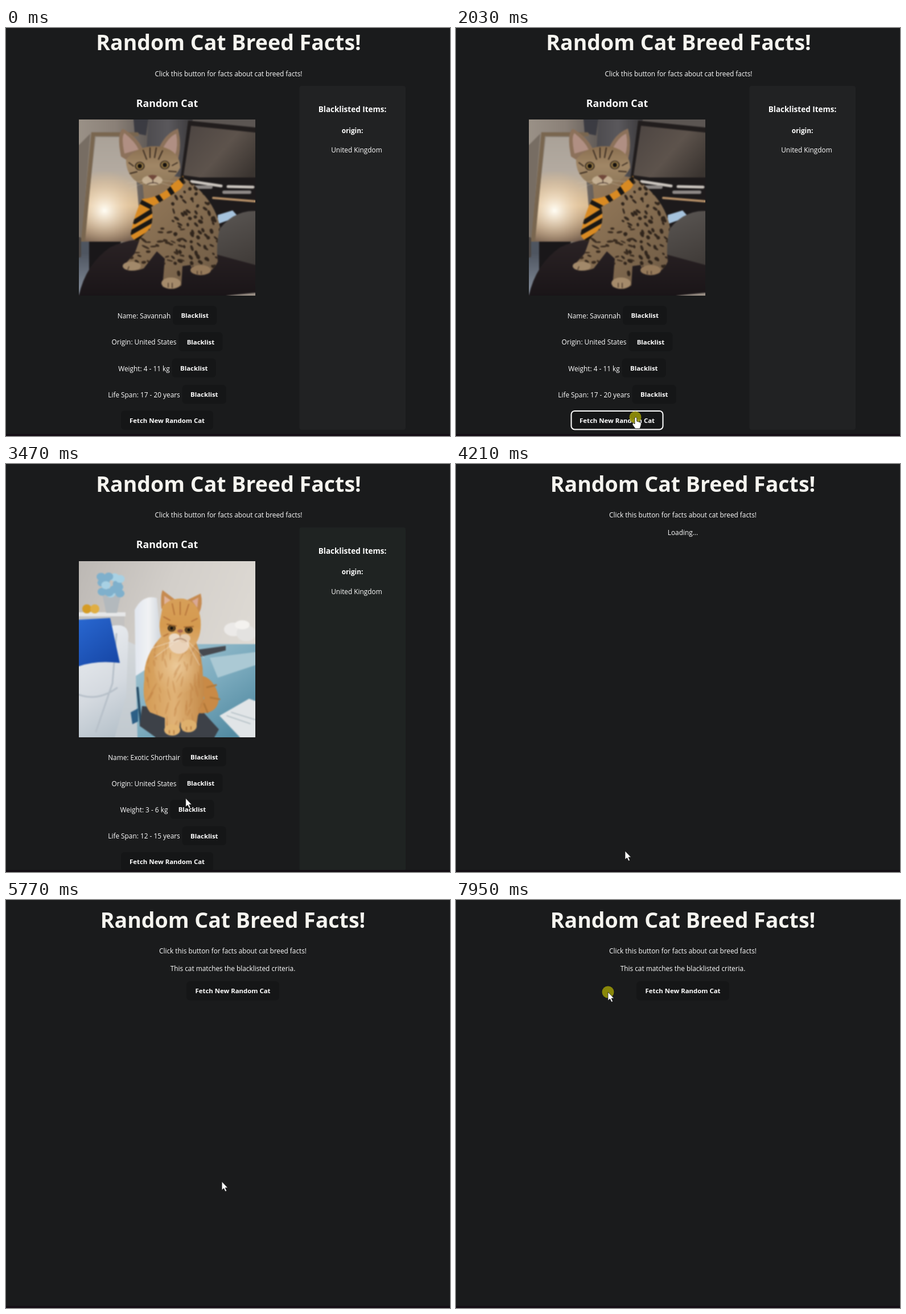
An HTML page with a canvas that plays this animation: 780x718 px, repeating every 8000 ms.

```html
<!DOCTYPE html>
<html lang="en">
<head>
<meta charset="utf-8">
<title>Random Cat Breed Facts!</title>
<style>
html, body { margin: 0; width: 100%; height: 100%; overflow: hidden; background: #1a1b1c; }
canvas { display: block; }
</style>
</head>
<body>
<canvas id="stage" width="780" height="718"></canvas>
<script>
const LOOP = 8000;
const ctx = document.getElementById('stage').getContext('2d');

// ---------- photos, painted once on 310 x 310 canvases ----------
function photo(paint) {
  const canvas = document.createElement('canvas');
  canvas.width = canvas.height = 310;
  const g = canvas.getContext('2d');
  let seed = 7;
  const random = () => (seed = seed * 16807 % 2147483647) / 2147483647;
  g.lineCap = 'round';
  const fill = (color, d) => { g.fillStyle = color; g.fill(new Path2D(d)); };
  const line = (color, width, d) => {
    g.strokeStyle = color; g.lineWidth = width; g.stroke(new Path2D(d));
  };
  const oval = (color, x, y, rx, ry = rx, turn = 0) => {
    g.fillStyle = color; g.beginPath(); g.ellipse(x, y, rx, ry, turn, 0, 7); g.fill();
  };
  const fade = (x0, y0, x1, y1, ...colors) => {
    const f = g.createLinearGradient(x0, y0, x1, y1);
    colors.forEach((c, i) => f.addColorStop(i / (colors.length - 1), c));
    return f;
  };
  const glow = (x, y, r, inner, outer) => {
    const f = g.createRadialGradient(x, y, 0, x, y, r);
    f.addColorStop(0, inner); f.addColorStop(1, outer);
    return f;
  };
  const inside = (d, draw) => { g.save(); g.clip(new Path2D(d)); draw(); g.restore(); };
  // jittered grid of marks within a shape
  const spots = (color, d, x, y, w, h, step, rx, ry, turn) => inside(d, () => {
    for (let j = 0; j < h; j += step)
      for (let i = 0; i < w; i += step)
        oval(color, x + i + random() * step, y + j + random() * step,
          rx * (.5 + random() * .6), ry * (.5 + random() * .6), turn + random());
  });
  const eye = (x, y, color, r) => {
    oval('#2a2019', x, y, r + 2, r + 1); oval(color, x, y, r, r - .5); oval('#15110f', x, y, r * .6);
  };
  paint({ fill, line, oval, fade, glow, inside, spots, eye });
  g.filter = 'blur(0.9px)';
  g.drawImage(canvas, 0, 0);
  return canvas;
}

const ALL = 'M0 0H310V310H0Z';

const savannah = photo(({ fill, line, oval, fade, glow, inside, spots, eye }) => {
  fill(fade(0, 0, 130, 0, '#9a9187', '#8a8077', '#5b5552'), ALL);
  fill('#3b3b42', 'M96 0H122L118 28L98 24Z');
  fill(fade(115, 0, 200, 0, '#4c4a4d', '#5a585c', '#3a383a'), 'M122 0H200L180 130H115Z');
  fill('#776d63', 'M0 45L20 25L3 240H0Z');
  fill(fade(0, 25, 0, 215, '#a9a197', '#b3aaa0', '#d9bd96', '#6e5a4c'), 'M30 31H95L110 215H8Z');
  inside('M30 31H95L110 215H8Z', () => oval(glow(45, 160, 70, '#fffdf5', '#f0c28a00'), 45, 160, 70));
  line('#79664f', 7, 'M102 26H25L5 240');
  fill('#211d1d', 'M192 2L310 14V150H172Z');
  fill(fade(200, 15, 300, 100, '#4f4743', '#5d534c', '#3a3430'), 'M197 11L310 23V116L184 98Z');
  fill('#1d1a1b', 'M170 102H310V205H170Z');
  line('#c9c3bd', 5, 'M198 109L250 117M262 118L306 119');
  line('#8c8785', 6, 'M205 119H232M255 128H300');
  line('#b58f67', 4, 'M236 138L310 144');
  fill('#a6c3dd', 'M244 168L270 160L280 171L244 184Z');
  fill(fade(0, 235, 0, 300, '#4e5560', '#7e8794'), 'M0 215H30V310H0Z');
  fill('#191719', 'M18 215H74L50 270H18Z');
  line('#4a4542', 6, 'M1 210V240');
  fill(fade(250, 160, 290, 260, '#5a5653', '#403b38'), 'M242 200Q268 160 310 161V260L235 240Z');
  fill(fade(0, 210, 0, 310, '#2b2325', '#1a1518'), 'M0 310Q12 255 55 225Q90 208 140 210L310 256V310Z');
  fill('#9a9086', 'M258 310L310 305V310Z');
  const body = 'M112 112Q175 85 205 118Q240 148 248 190Q240 220 244 250Q232 277 202 271L196 256L182 258L180 292Q165 303 147 294L151 245L137 232L114 262Q90 271 77 259L98 236Q115 190 117 172Z';
  fill(fade(110, 120, 240, 250, '#94795a', '#846c50', '#745f48'), body);
  spots('#30251c', body, 165, 105, 80, 160, 12, 5, 3, .4);
  spots('#3a2c20', body, 80, 190, 95, 65, 13, 7, 2.5, -.3);
  oval('#a58b6b', 162, 288, 17, 10); oval('#a2896a', 93, 258, 16, 8); oval('#95795a', 214, 265, 18, 9);
  line('#4a392b', 1.5, 'M157 288V295M164 288V296M88 259L86 264M208 267V272M215 267V272');
  fill('#8c715a', 'M74 65Q66 25 77 16Q102 30 113 53L91 76Z');
  fill('#b08f83', 'M80 60Q74 30 80 24Q99 39 105 53Z');
  fill('#8c715a', 'M140 52Q151 25 174 16Q182 45 173 75Z');
  fill('#b08f83', 'M147 52Q158 30 171 25Q175 46 169 63Z');
  fill(fade(0, 45, 0, 118, '#876c4e', '#a18766', '#8c7658'), 'M83 70Q108 42 146 48Q178 56 178 85Q164 111 139 117Q115 122 96 105Q82 90 83 70Z');
  line('#392b20', 2, 'M113 54L119 70M125 50V67M136 50L133 67M147 55L140 70M88 76L96 82M173 76L164 81M90 95L102 92M171 92L158 91');
  eye(107, 82, '#a9884b', 6.5); eye(151, 80, '#a9884b', 6.5);
  oval('#c2ad90', 129, 107, 18, 9);
  fill('#70483a', 'M121 99Q129 96 138 99L130 107Z');
  line('#41302a', 1.2, 'M130 106V112M120 114Q130 109 139 113');
  line('#d8c9b688', .7, 'M119 107L85 112M119 110L88 122M139 107L178 110M139 110L175 121');
  const tie = 'M183 99Q188 113 178 123Q150 142 127 154Q132 172 126 190L103 214Q92 211 91 201Q98 165 111 140Q145 137 163 115Z';
  fill('#d98a22', tie);
  inside(tie, () => {
    line('#191715', 8, 'M172 95L192 118M153 113L170 139M132 126L150 151M105 143L138 160');
    line('#191715', 8, 'M98 180L135 157M90 200L132 176M96 217L132 195');
  });
});

const exotic = photo(({ fill, line, oval, fade, glow, inside, spots, eye }) => {
  fill(fade(0, 0, 310, 120, '#bcb8b4', '#d3cfca', '#dedad4'), ALL);
  fill('#c3c2c1', 'M0 92H80V150H0Z'); fill('#e6e7e8', 'M0 90H82V97H0Z');
  fill('#b3b9bd', 'M41 58H74L67 91H48Z');
  for (let i = 0; i < 15; i++)
    oval(i % 3 ? '#7fb0cc' : '#a8d1e4', 56 + 17 * Math.sin(i * 2.4), 42 + 15 * Math.cos(i * 1.7), 8, 7);
  oval('#d59b24', 14, 84, 8, 8); oval('#e0ae43', 28, 84, 8, 8);
  fill(fade(0, 150, 0, 300, '#d3d7da', '#c2cad0'), 'M84 140L105 150V310H62Z');
  fill(fade(95, 0, 150, 0, '#dfe5ee', '#f1f2f4', '#c7ced6'), 'M98 86Q112 58 137 65L148 185L125 215L100 210Z');
  fill(fade(150, 150, 260, 310, '#9cc0ce', '#7dacbf', '#548ca3'), 'M100 202L185 146H310V310H103Z');
  fill('#abc9d4', 'M230 170L310 160V183L244 205Z');
  fill(fade(0, 150, 90, 300, '#e7eaee', '#d5dae0', '#b4c0c9'), 'M0 170L58 114Q87 108 87 132L83 238L63 310H0Z');
  line('#b7c0c9', 3, 'M66 128L59 215L30 300M0 235Q34 247 67 223');
  fill(fade(0, 105, 60, 180, '#2866cf', '#1748a8'), 'M0 103L55 100L72 179Q30 174 0 185Z');
  fill('#46494f', 'M200 157L258 149V157L215 168Z');
  oval('#eceae8', 272, 120, 17, 12); oval('#e3e2e0', 294, 127, 17, 14); oval('#f4f2ef', 287, 112, 13, 8);
  fill('#2d5f86', 'M91 266L104 259V282L94 287Z');
  line('#284d67', 4, 'M103 223L109 289');
  fill('#3d4148', 'M111 255L216 263L246 296L238 310H135L107 290Z');
  fill('#e1e5e7', 'M247 272L299 242L310 246V310H283Z');
  line('#aebbc1', 1.5, 'M260 272L301 286M268 266L310 279');
  line('#c98a46', 25, 'M213 255Q237 257 232 236Q227 220 217 215');
  line('#b27839', 3, 'M225 222L241 218M231 240L247 243M220 251L226 266');
  const body = 'M149 128Q112 166 115 208Q110 247 125 266L151 276L151 299Q162 309 176 299L178 282L182 298Q195 306 206 294L209 272Q225 244 218 205Q218 170 204 137Z';
  fill(fade(115, 0, 220, 0, '#d39a54', '#e0b276', '#c48a49'), body);
  oval(glow(172, 185, 55, '#ecca9a', '#e0b27600'), 172, 185, 40, 50);
  spots('#b9783c55', body, 110, 145, 115, 145, 16, 11, 2, 1.2);
  oval('#e1b371', 164, 297, 14, 10); oval('#deb06d', 193, 290, 14, 11);
  line('#a96d37', 1.5, 'M159 298V303M167 298V304M189 292V297M197 291V296');
  fill('#c68b51', 'M145 84Q143 60 147 51L172 70Z'); fill('#deb29a', 'M150 76V61L163 70Z');
  fill('#c68b51', 'M191 68L214 57Q219 76 211 92Z'); fill('#d8a895', 'M199 70L210 64L208 82Z');
  fill(fade(0, 60, 0, 168, '#d7a05a', '#d59a4f', '#e0b680'), 'M147 80Q160 64 184 66Q211 72 214 104Q216 136 200 151Q181 168 158 151Q140 137 142 108Z');
  line('#b5733a', 2, 'M164 75L168 94M178 72V94M193 76L187 95M149 98L160 104M208 101L198 106M149 132L157 128');
  oval('#ead3ba', 176, 147, 18, 16); oval('#ecdac5', 168, 135, 10, 8); oval('#e5cbae', 186, 136, 10, 8);
  eye(163, 118, '#815c23', 5); eye(193, 121, '#815c23', 5);
  line('#a0662f', 2, 'M155 111L171 114M201 115L185 116');
  oval('#a9664f', 178, 123, 5, 3);
  line('#a57b61', 1.3, 'M178 127V133M167 140Q178 132 189 141');
  line('#f4eadb', .8, 'M165 141L126 154M166 145L133 169M190 143L212 183M191 140L220 170');
});

const ocicat = photo(({ fill, line, oval, fade, glow, inside, spots, eye }) => {
  fill(glow(150, 60, 230, '#bf6239', '#96401f'), ALL);
  fill(fade(0, 152, 0, 310, '#a54d2d', '#904023', '#702d17', '#522011'), 'M0 153L310 156V310H0Z');
  fill(fade(0, 152, 0, 181, '#b65c38', '#a0482a'), 'M0 152L310 155V176L0 179Z');
  line('#471b1066', 15, 'M55 178Q52 239 39 280M190 185Q203 249 216 300');
  line('#542414', 7, 'M75 174Q142 180 187 172L258 170');
  const tail = 'M66 96Q38 120 38 157Q37 207 30 247Q25 264 25 272Q34 281 41 269Q56 224 58 178Q57 146 76 124Z';
  fill('#a07a5b', tail);
  inside(tail, () => {
    for (let y = 125; y < 280; y += 17) line(y > 210 ? '#211814' : '#3b281d', 9, `M25 ${y + 4}L70 ${y - 4}`);
  });
  const body = 'M65 98Q79 73 122 76Q157 83 195 73L224 82L252 103Q258 126 249 149L285 154Q292 166 276 171L239 170L216 166Q211 198 226 235L230 284Q228 301 216 300Q205 296 210 279Q197 228 173 190L169 168L104 171Q64 169 61 150Q73 129 65 98Z';
  fill(fade(90, 72, 130, 185, '#8f6040', '#ac7b55', '#c79a75'), body);
  spots('#3f281b', body, 62, 74, 135, 92, 19, 9, 5.5, .4);
  spots('#432b1e', body, 174, 150, 60, 128, 17, 12, 4, -.6);
  line('#482e20', 5, 'M205 91Q214 112 237 109M206 114Q222 132 250 121M205 133L234 147');
  line('#d3ad8a', 11, 'M243 161L279 163'); oval('#d3ac88', 219, 286, 10, 13);
  line('#59412f', 2, 'M216 290V298M223 290V297M278 160L287 164M276 165L286 169M255 157L258 167');
  fill('#b07d58', 'M208 51Q204 18 213 6Q229 18 232 40Z'); fill('#d6b4a2', 'M212 42L214 17L228 38Z');
  fill('#b07d58', 'M238 37Q248 13 259 7Q265 31 258 55Z'); fill('#d6b09b', 'M245 38L257 18L256 45Z');
  fill(fade(0, 35, 0, 105, '#96633f', '#b98a62', '#d8ba98'), 'M210 46Q232 28 257 44Q265 65 256 85L243 102Q231 108 219 97Q204 78 210 46Z');
  line('#3f291b', 2, 'M223 40L229 55M234 37V54M246 40L240 55M211 67L218 71M258 66L251 71M210 80L220 78M257 79L248 78');
  eye(222, 61, '#8a8560', 5); eye(245, 60, '#8a8560', 5);
  oval('#e6d3bd', 234, 90, 11, 8); fill('#9b5b45', 'M229 79H239L234 85Z');
  line('#6b4836', 1.2, 'M234 86V91M227 94Q234 90 241 94');
  line('#f0e0cf', .7, 'M225 89L200 97M226 93L202 111M243 89L270 76M243 92L275 102');
});

// ---------- page ----------
const scenes = [
  { from: 0, hoverFrom: 0, scroll: 9.5, photo: savannah, panel: '#212223',
    facts: ['Name: Savannah', 'Origin: United States', 'Weight: 4 - 11 kg', 'Life Span: 17 - 20 years'] },
  { from: 2160, note: 'Loading...' },
  { from: 2450, hoverFrom: 3130, scroll: 0, photo: exotic, panel: '#1f2322',
    facts: ['Name: Exotic Shorthair', 'Origin: United States', 'Weight: 3 - 6 kg', 'Life Span: 12 - 15 years'] },
  { from: 4020, note: 'Loading...' },
  { from: 4480, hoverFrom: 4750, scroll: 0, photo: ocicat, panel: '#212321',
    facts: ['Name: Ocicat', 'Origin: United States', 'Weight: 3 - 7 kg', 'Life Span: 12 - 14 years'] },
  { from: 5240, hoverFrom: 5640, note: 'This cat matches the blacklisted criteria.', retry: true }
];

// time, x, y
const pointerPath = [
  [590, 713, 441], [800, 520, 556], [1000, 410, 562], [1290, 335, 508], [1430, 335, 508],
  [1560, 340, 560], [1720, 346, 640], [1890, 315, 685], [3060, 315, 685], [3130, 380, 668],
  [3270, 452, 630], [3470, 316, 588], [3640, 268, 625], [3810, 298, 663], [3880, 297, 681],
  [4690, 297, 681], [5040, 328, 604], [5640, 328, 604], [5850, 410, 430], [6100, 400, 165],
  [6370, 303, 116], [6500, 297, 115], [6600, 350, 110], [6710, 419, 115], [6900, 490, 118],
  [7180, 513, 122], [7320, 513, 122], [7600, 400, 132], [7900, 267, 162]
];
const presses = [[2025, 2160], [3945, 4020], [5100, 5240], [6500, 7250], [7940, LOOP]];
const cursors = {
  arrow: new Path2D('M0 0V15L3.5 12L6 17.5L8.5 16.5L6 11H10.5Z'),
  hand: new Path2D('M-1 1Q1 -1 2.5 1V7L9 9Q11 10 10 14L8 20H0L-5 13Q-5 10 -3 10L-1 12Z'),
  beam: new Path2D('M-3 -7.5Q0 -7.5 0 -6Q0 -7.5 3 -7.5M0 -6V6M-3 7.5Q0 7.5 0 6Q0 7.5 3 7.5')
};

function pointerAt(t) {
  const next = pointerPath.findIndex(p => p[0] > t);
  if (next === 0) return null;
  if (next < 0) { const [, x, y] = pointerPath.at(-1); return { x, y }; }
  const [t0, x0, y0] = pointerPath[next - 1], [t1, x1, y1] = pointerPath[next];
  const k = (t - t0) / (t1 - t0);
  return { x: x0 + (x1 - x0) * k, y: y0 + (y1 - y0) * k };
}

function text(string, x, y, size, weight = 400, align = 'center') {
  ctx.font = `${weight} ${size}px "Open Sans", "Noto Sans", sans-serif`;
  ctx.textAlign = align;
  ctx.fillStyle = size > 30 ? '#f5f4ef' : '#fff';
  ctx.fillText(string, x, y);
}

function box(color, x, y, w, h, r) {
  ctx.fillStyle = color;
  ctx.beginPath(); ctx.roundRect(x, y, w, h, r); ctx.fill();
}

// Returns true while the pointer is over the button.
function button(label, x, y, w, pointer) {
  const h = 33.5;
  box('#151617', x, y, w, h, 6);
  const over = pointer && pointer.x > x && pointer.x < x + w && pointer.y > y && pointer.y < y + h;
  if (over) {
    ctx.strokeStyle = '#fff'; ctx.lineWidth = 2;
    ctx.beginPath(); ctx.roundRect(x + .5, y + .5, w - 1, h - 1, 6); ctx.stroke();
  }
  text(label, x + w / 2, y + 21.3, 11.4, 700);
  return over;
}

function catPage(scene, pointer) {
  const shift = -scene.scroll;
  box(scene.panel, 515.5, 111.5 + shift, 186.5, 605, 4);
  text('Blacklisted Items:', 608.5, 157.5 + shift, 13.5, 700);
  text('origin:', 608.5, 194 + shift, 11.8, 700);
  text('United Kingdom', 616, 228.5 + shift, 11.85);
  text('Random Cat', 283, 148 + shift, 17.8, 700);
  ctx.drawImage(scene.photo, 128, Math.round(170.6 + shift));
  let over = false;
  scene.facts.forEach((fact, i) => {
    const y = 498.5 + i * 46.3 + shift;
    ctx.font = '400 11.85px "Open Sans", "Noto Sans", sans-serif';
    const width = ctx.measureText(fact).width, left = 283 - (width + 81) / 2;
    text(fact, left, y + 22, 11.85, 400, 'left');
    over = button('Blacklist', left + width + 4, y, 77, pointer) || over;
  });
  return button('Fetch New Random Cat', 202, 683 + shift, 162, pointer) || over;
}

function notePage(scene, pointer, t, x) {
  if (scene.retry && t > 6500 && t < 7940) {
    const end = t < 7250 ? Math.min(507, Math.max(297, pointer.x - 3)) : 507;
    box('#0557b5', 297, 111, end - 297, 19, 0);
  }
  text(scene.note, x, 125, 11.85);
  return scene.retry && button('Fetch New Random Cat', 317, 143, 163, pointer);
}

function drawPointer({ x, y }, shape, pressed) {
  if (pressed) {
    ctx.fillStyle = 'rgba(152, 150, 8, .88)';
    ctx.beginPath(); ctx.arc(x, y, 10.5, 0, 7); ctx.fill();
  }
  ctx.save();
  ctx.translate(x, y);
  if (shape === 'beam') {
    ctx.translate(2, 0);
    ctx.strokeStyle = '#e9e7c8'; ctx.lineWidth = 1.2;
  } else {
    ctx.fillStyle = '#fff'; ctx.fill(cursors[shape]);
    ctx.strokeStyle = '#111'; ctx.lineWidth = .7;
  }
  ctx.stroke(cursors[shape]);
  ctx.restore();
}

function draw(t) {
  const scene = scenes.findLast(s => s.from <= t);
  const pointer = pointerAt(t);
  const hover = t >= scene.hoverFrom ? pointer : null;
  const center = scene.photo ? 391 : 398.5;
  const shift = -(scene.scroll || 0);
  box('#1a1b1c', 0, 0, 780, 718, 0);
  text('Random Cat Breed Facts!', center, 48.5 + shift, 37.5, 700);
  text('Click this button for facts about cat breed facts!', center, 94 + shift, 11.8);
  const over = scene.photo ? catPage(scene, hover) : notePage(scene, hover, t, center);
  box('#150e15', 0, 714.5, 780, 4, 0);
  if (!pointer) return;
  const onText = scene.retry && pointer.y > 109 && pointer.y < 131 && pointer.x > 290 && pointer.x < 508;
  const pressed = presses.some(([from, to]) => t >= from && t < to);
  drawPointer(pointer, over ? 'hand' : onText ? 'beam' : 'arrow', pressed);
}

const start = performance.now();
function tick() {
  draw((performance.now() - start) % LOOP);
  requestAnimationFrame(tick);
}
tick();
</script>
</body>
</html>
```
